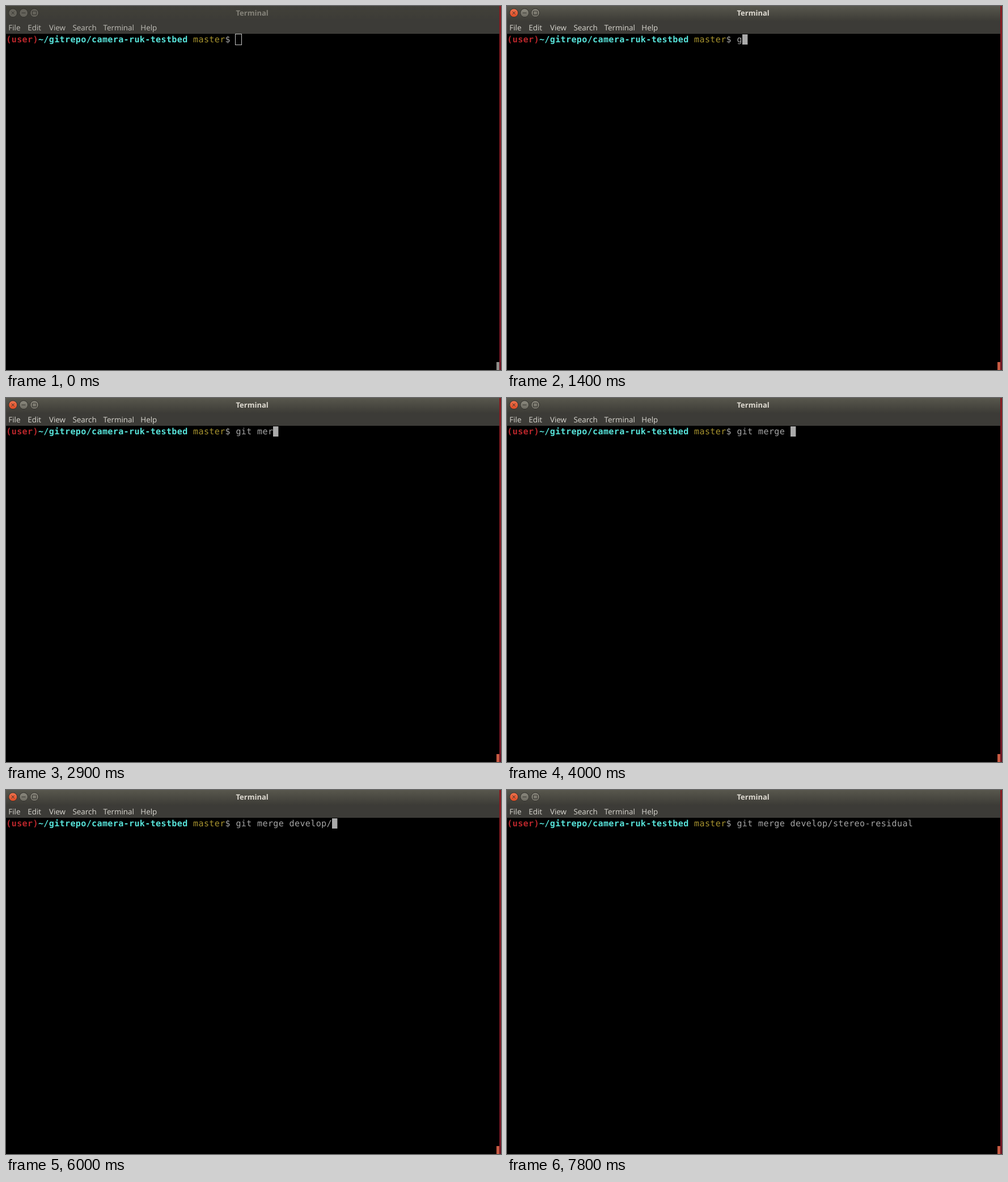
These frames come from a looping animation (873 by 642 pixels, 8000 ms). An HTML page:

```html
<!DOCTYPE html>
<html lang="en">
<head>
<meta charset="utf-8">
<title>Terminal</title>
<style>
  html, body { margin: 0; width: 100%; height: 100%; overflow: hidden; background: #000; }
  svg { display: block; text-rendering: geometricPrecision; }
  .ui { font: 13.4px "Open Sans", "Noto Sans", sans-serif; fill: #d8d6cf; }
  .title { font-weight: 700; font-size: 13px; }
  .mono { font: 15.07px "DejaVu Sans Mono", monospace; letter-spacing: .349px; fill: #a6a6a6; white-space: pre; }
  .bold { font-weight: 700; }
  .glyph { fill: none; stroke: #34332e; }
</style>
</head>
<body>
<svg width="873" height="642" viewBox="0 0 873 642">
  <defs>
    <linearGradient id="bar" x2="0" y2="1">
      <stop stop-color="#58574d"/><stop offset="1" stop-color="#3d3c37"/>
    </linearGradient>
    <linearGradient id="dimBar" x2="0" y2="1">
      <stop stop-color="#424139"/><stop offset="1" stop-color="#3c3b37"/>
    </linearGradient>
    <linearGradient id="red" x2="0" y2="1">
      <stop stop-color="#f0744f"/><stop offset="1" stop-color="#dc4a23"/>
    </linearGradient>
    <linearGradient id="grey" x2="0" y2="1">
      <stop stop-color="#8b897e"/><stop offset="1" stop-color="#6c6a61"/>
    </linearGradient>
    <linearGradient id="edge" x2="0" y2="1">
      <stop stop-color="#851b20"/><stop offset="1" stop-color="#701523"/>
    </linearGradient>
    <circle id="button" cy="12.2" r="7.5" stroke="#32312d"/>
  </defs>

  <rect width="873" height="642"/>
  <rect width="870" height="49" fill="#3c3b37"/>
  <rect x="870" width="3" height="642" fill="url(#edge)"/>

  <g>
    <rect width="870" height="26" fill="url(#dimBar)"/>
    <g fill="#64625a">
      <use href="#button" x="12.2"/><use href="#button" x="31.1"/><use href="#button" x="50"/>
    </g>
    <text class="ui title" x="405.5" y="17" style="fill:#85837a">Terminal</text>
    <rect x="865" y="628" width="5" height="14" fill="#8e8d89"/>
  </g>

  <g id="focus">
    <rect width="870" height="26" fill="url(#bar)"/>
    <g fill="url(#grey)">
      <use href="#button" x="12.2" fill="url(#red)"/><use href="#button" x="31.1"/><use href="#button" x="50"/>
    </g>
    <text class="ui title" x="405.5" y="17" style="fill:#dfdbd2">Terminal</text>
    <rect x="865" y="628" width="5" height="14" fill="#c65a42"/>
  </g>

  <path class="glyph" d="M9.7 9.7l5 5m0-5l-5 5M27.5 12.2h7M46.5 9h7v6.5h-7z"/>

  <g class="ui" id="menu">
    <text x="4.3" y="43">File</text>
    <text x="38.3" y="43">Edit</text>
    <text x="76" y="43">View</text>
    <text x="117.5" y="43">Search</text>
    <text x="171.5" y="43">Terminal</text>
    <text x="237.3" y="43">Help</text>
  </g>

  <g id="line"></g>
  <rect id="hollow" x="404.5" y="49.5" width="11" height="19" fill="none" stroke="#c4c4c4"/>
  <rect id="cursor" y="50" width="9.4" height="18" fill="#aaa"/>
</svg>

<script>
const LOOP = 8000, CELL = 9.421, INSET = .35, START = 43;
const FOCUS = 500, KEY_GAP = 90, BLINK = 600, COMPLETE_DELAY = 330;
const $ = id => document.getElementById(id);

function addText(col, text, fill, bold) {
  const el = document.createElementNS("http://www.w3.org/2000/svg", "text");
  el.setAttribute("class", bold ? "mono bold" : "mono");
  el.setAttribute("x", col * CELL + INSET);
  el.setAttribute("y", 64);
  if (fill) el.style.fill = fill;
  el.textContent = text;
  $("line").append(el);
  return el;
}

addText(0, "(user)", "#b9262b", true);
addText(6, "~/gitrepo/camera-ruk-testbed", "#57e2d9", true);
addText(35, "master", "#a8942f");
addText(41, "$");
const typed = addText(START, "");

// Bursts of evenly spaced keys; the final tab asks for completion.
const bursts = {
  1400: "git ", 2400: "me", 2900: "rge", 4000: " ", 4500: "d",
  4620: "eve", 5100: "l", 5310: "op", 6000: "/", 6900: "ste\t"
};
const keys = Object.entries(bursts).flatMap(([start, text]) =>
  [...text].map((char, i) => ({ char, time: +start + i * KEY_GAP })));

function draw(now) {
  const t = now % LOOP;
  const pressed = keys.filter(key => key.time <= t);
  const last = pressed.at(-1) || { time: FOCUS };
  let text = pressed.map(key => key.char).join("").trimEnd();
  if (last.char === " ") text += " ";
  if (last.char === "\t" && t >= last.time + COMPLETE_DELAY) text += "reo-residual ";

  const focus = t < FOCUS ? 0 : t < FOCUS + 100 ? .5 : 1;
  const lit = t - last.time < BLINK;
  $("focus").setAttribute("opacity", focus);
  $("menu").setAttribute("opacity", .85 + .15 * focus);
  $("hollow").setAttribute("opacity", 1 - focus);
  $("cursor").setAttribute("opacity", lit ? focus : 0);
  $("cursor").setAttribute("x", Math.round((START + text.length) * CELL + INSET));
  typed.textContent = text;
}

function tick() {
  draw(performance.now());
  requestAnimationFrame(tick);
}
tick();
</script>
</body>
</html>
```
